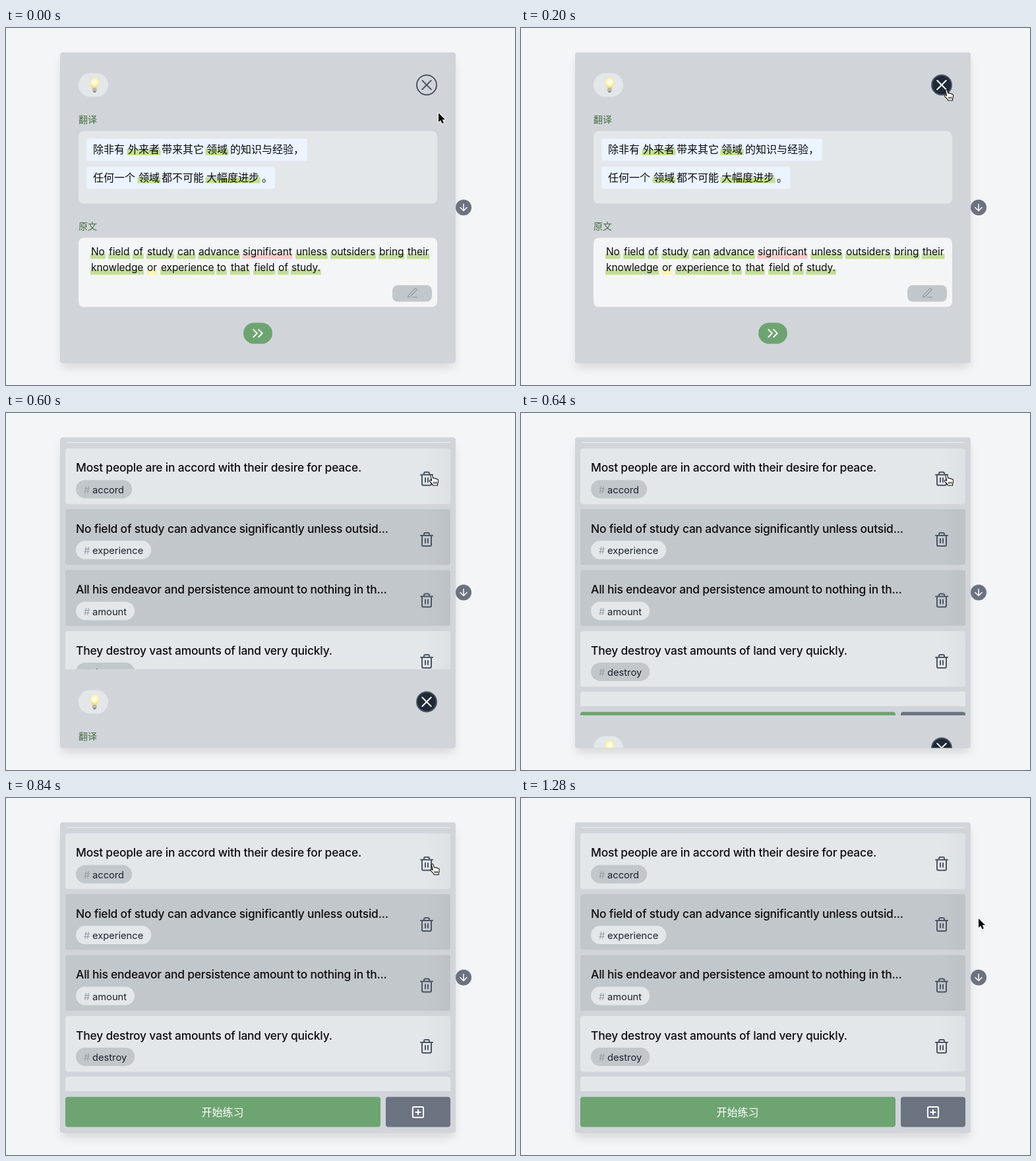
Write an HTML page with a canvas that moves like this. It is 772x542 px and loops after 1.75 s.

```html
<!DOCTYPE html>
<html lang="zh-CN">
<head>
<meta charset="utf-8">
<title>Sentence practice</title>
<style>
html, body { margin: 0; width: 100%; height: 100%; overflow: hidden; background: #f3f5f7; }
canvas { display: block; width: 772px; height: 542px; }
</style>
</head>
<body>
<canvas id="stage" width="772" height="542"></canvas>
<script>
const ctx = document.getElementById('stage').getContext('2d');
const LOOP = 1750, TICK = 40;
const PANEL = { x: 82, y: 37, w: 600, h: 471.5 };
const COLOR = {
  page: '#f3f5f7', panel: '#d1d5da', light: '#e3e7ea', dark: '#c2c7cb', ink: '#0b0c0e',
  icon: '#4b5563', slate: '#6b7280', green: '#6ea471', label: '#476f43',
  known: '#c3de94', hard: '#fbcaca', fresh: '#fdf3b4'
};
const LATIN = 'Inter, sans-serif';
const HAN = '"Noto Sans CJK SC", "Noto Sans CJK", sans-serif';

const ICON = {
  trash: new Path2D('M3 6H21M19 6v14a2 2 0 0 1-2 2H7a2 2 0 0 1-2-2V6m3 0V4a2 2 0 0 1 2-2h4a2 2 0 0 1 2 2v2M10 11v6M14 11v6'),
  cross: new Path2D('M18 6L6 18M6 6l12 12'),
  down: new Path2D('M12 5v14M19 12l-7 7-7-7'),
  next: new Path2D('M13 17l5-5-5-5M6 17l5-5-5-5'),
  edit: new Path2D('M12 20h9M16.5 3.5a2.12 2.12 0 0 1 3 3L7 19l-4 1 1-4z'),
  add: new Path2D('M5 3h14a2 2 0 0 1 2 2v14a2 2 0 0 1-2 2H5a2 2 0 0 1-2-2V5a2 2 0 0 1 2-2zM12 8v8M8 12h8')
};
const ARROW = new Path2D('M0 0V13.8L3.2 10.9L5.4 16L7.9 14.9L5.7 10H10Z');
const HAND = new Path2D('M-1.6 1C-1.6-.8 .6-1 1.1 .8L2.3 5.2C3.4 4.3 4.6 4.8 5 5.7C6 5 7.2 5.5 7.5 6.4C8.7 5.9 9.9 6.6 10 8C10.3 10.4 10.1 12.2 9 14V16H2.2C1.4 13.5-.8 12.2-2.6 10.1C-4 8.6-2.4 7.1-.9 8.1L.2 9Z');

const CARDS = [
  ['Most people are in accord with their desire for peace.', 'accord', false],
  ['No field of study can advance significantly unless outsid...', 'experience', true],
  ['All his endeavor and persistence amount to nothing in th...', 'amount', true],
  ['They destroy vast amounts of land very quickly.', 'destroy', false]
];
const TRANSLATION = [
  { y: 168, right: 457, parts: [['除非有', 132], ['外来者', 185, 1], ['带来其它', 236], ['领域', 304, 1], ['的知识与经验，', 340]] },
  { y: 210.5, right: 408, parts: [['任何一个', 132], ['领域', 201, 1], ['都不可能', 236], ['大幅度进步', 304, 1], ['。', 388]] }
];
const SENTENCE = [
  { y: 344.5, words: [['No', 129], ['field', 156], ['of', 193], ['study', 214], ['can', 260], ['advance', 292],
    ['significant', 359, 'hard'], ['unless', 440], ['outsiders', 493], ['bring', 566], ['their', 609]] },
  { y: 368.5, words: [['knowledge', 129], ['or', 214, 'fresh'], ['experience', 235], ['to', 320], ['that', 341],
    ['field', 376], ['of', 413], ['study.', 433]] }
];

const mix = (a, b, k) => a + (b - a) * k;
const clamp = k => Math.max(0, Math.min(1, k));

function box(x, y, w, h, r, fill) {
  ctx.beginPath();
  ctx.roundRect(x, y, w, h, r);
  ctx.fillStyle = fill;
  ctx.fill();
}

function disc(x, y, r, fill) {
  ctx.beginPath();
  ctx.arc(x, y, r, 0, Math.PI * 2);
  ctx.fillStyle = fill;
  ctx.fill();
}

function setFont(font, spacing = 0) {
  ctx.font = font;
  ctx.letterSpacing = spacing + 'px';
}

function text(str, x, y, fill) {
  ctx.fillStyle = fill;
  ctx.fillText(str, x, y);
}

function icon(path, cx, cy, scale, color, width = 2) {
  ctx.save();
  ctx.translate(cx, cy);
  ctx.scale(scale, scale);
  ctx.translate(-12, -12);
  ctx.lineWidth = width / scale;
  ctx.lineCap = ctx.lineJoin = 'round';
  ctx.strokeStyle = color;
  ctx.stroke(path);
  ctx.restore();
}

function drawPanel() {
  const { x, y, w, h } = PANEL;
  ctx.save();
  ctx.shadowColor = 'rgba(0,0,0,0.12)';
  ctx.shadowBlur = 15;
  ctx.shadowOffsetY = 7;
  box(x + 2, y + 3, w - 4, h - 3, 4, COLOR.panel);
  ctx.restore();
  box(x, y, w, h, 4, COLOR.panel);
}

function drawCard([title, tag, dark], y) {
  box(90, y, 584, 84.5, 4, dark ? COLOR.dark : COLOR.light);
  const shade = ctx.createLinearGradient(636, 0, 674, 0);
  shade.addColorStop(0, 'rgba(90,100,115,0)');
  shade.addColorStop(1, 'rgba(90,100,115,0.05)');
  box(636, y, 38, 84.5, [0, 4, 4, 0], shade);
  setFont(`500 17.4px ${LATIN}`, -0.19);
  text(title, 106, y + 35.7, COLOR.ink);
  setFont(`14.7px ${LATIN}`);
  box(106, y + 48, ctx.measureText(tag).width + 37, 28, 14, dark ? COLOR.light : COLOR.dark);
  text('#', 118, y + 68, '#969da6');
  text(tag, 131, y + 68, '#1c222b');
  icon(ICON.trash, 638, y + 46, 1, COLOR.icon);
}

function drawList() {
  box(92, 44, 581, 1.5, 0.7, '#e6e9ec');
  CARDS.forEach((card, i) => drawCard(card, 53.7 + i * 92.4));
  box(90, 423, 584, 22, [4, 4, 0, 0], COLOR.light);
  box(90, 453.7, 478, 45.7, 4, COLOR.green);
  box(576, 453.7, 98, 45.7, 4, COLOR.slate);
  setFont(`500 16px ${HAN}`);
  text('开始练习', 296.5, 482.7, '#fff');
  icon(ICON.add, 625, 477, 0.9, '#fff');
}

function drawBulb(x, y) {
  const glow = ctx.createRadialGradient(x, y - 4, 1, x, y - 4, 8);
  glow.addColorStop(0, '#fffef0');
  glow.addColorStop(0.6, '#fff6bd');
  glow.addColorStop(1, '#f2d778');
  ctx.beginPath();
  ctx.arc(x, y - 4, 7, Math.PI * 0.82, Math.PI * 0.18);
  ctx.quadraticCurveTo(x + 3.8, y + 3, x + 3.5, y + 6);
  ctx.lineTo(x - 3.5, y + 6);
  ctx.quadraticCurveTo(x - 3.8, y + 3, x - 5.9, y - 0.3);
  ctx.fillStyle = glow;
  ctx.fill();
  box(x - 3.4, y + 5.5, 6.8, 5, 1.5, '#a7a9a7');
  box(x - 3.4, y + 7.3, 6.8, 1, 0, '#d6d7d3');
  box(x - 2, y + 10, 4, 1.8, 1, '#777b7d');
}

function drawClose(hover) {
  disc(638, 86.5, 15, `rgba(31,41,55,${hover})`);
  ctx.lineWidth = 2;
  ctx.strokeStyle = COLOR.icon;
  ctx.stroke();
  const [r, g, b] = [75, 85, 99].map(c => Math.round(mix(c, 255, hover)));
  icon(ICON.cross, 638, 86.5, 1.12, `rgb(${r},${g},${b})`);
}

function drawTranslation() {
  box(110, 156.5, 544, 110, 8, COLOR.light);
  for (const { y, right, parts } of TRANSLATION) {
    box(122, y, right - 122, 33.7, 4, '#ebf4ff');
    setFont(`16px ${HAN}`);
    for (const [str, x, marked] of parts) {
      if (marked) box(x - 1.5, y + 16, ctx.measureText(str).width + 3, 9, 0, COLOR.known);
      text(str, x, y + 22, COLOR.ink);
    }
  }
}

function drawSentence() {
  box(110, 318.5, 544, 105, 8, '#f4f5f7');
  setFont(`15.5px ${LATIN}`, -0.1);
  for (const { y, words } of SENTENCE) {
    for (const [word, x, kind = 'known'] of words) {
      box(x - 1, y - 2, ctx.measureText(word).width + 2, 8, 0, COLOR[kind]);
      text(word, x, y, COLOR.ink);
    }
  }
  box(586, 390.5, 60, 25, 8, COLOR.dark);
  icon(ICON.edit, 616.5, 402.5, 0.78, '#989fa8', 1.4);
}

function drawSheet(offset, hover) {
  ctx.save();
  ctx.translate(0, offset);
  box(PANEL.x, PANEL.y, PANEL.w, PANEL.h, 4, COLOR.panel);
  box(110, 68.5, 45, 36, 18, COLOR.light);
  drawBulb(134.3, 86);
  drawClose(hover);
  setFont(`14px ${HAN}`);
  text('翻译', 110, 143.7, COLOR.label);
  text('原文', 110, 305.7, COLOR.label);
  drawTranslation();
  drawSentence();
  box(360, 447.5, 44, 32, 16, COLOR.green);
  icon(ICON.next, 382, 463.5, 1.12, '#fff');
  ctx.restore();
}

function drawPointer(x, y, hand) {
  ctx.save();
  ctx.translate(x, y);
  ctx.lineJoin = 'round';
  if (hand) {
    ctx.fillStyle = '#fff';
    ctx.fill(HAND);
    ctx.lineWidth = 1.1;
    ctx.strokeStyle = '#111';
    ctx.stroke(HAND);
    ctx.stroke(new Path2D('M3.3 10.5v3M5.4 10.5v3M7.5 10.5v3'));
  } else {
    ctx.lineWidth = 2;
    ctx.strokeStyle = '#fff';
    ctx.stroke(ARROW);
    ctx.fillStyle = '#000';
    ctx.fill(ARROW);
  }
  ctx.restore();
}

// The sheet stalls at first, then leaves in a few uneven steps.
function sheetOffset(t) {
  const steps = [[680, 472], [640, 422], [600, 352], [520, 223.5]];
  const step = steps.find(([from]) => t >= from);
  return step ? step[1] : 0;
}

function pointerAt(t) {
  if (t < 700) {
    const k = 1 - (1 - clamp(t / 200)) ** 2.2;
    const x = mix(656, 645.5, k), y = mix(129, 94, k);
    return { x, y, hand: Math.hypot(x - 638, y - 86.5) < 16 };
  }
  const u = clamp((t - 740) / 380);
  const k = u < 0.5 ? 4 * u ** 3 : 1 - 4 * (1 - u) ** 3;
  const x = mix(645.5, 694, k ** 1.3), y = mix(94, 183, k);
  return { x, y, hand: x < 674 };
}

function draw(now) {
  const t = Math.floor((now % LOOP) / TICK) * TICK;
  const offset = sheetOffset(t);
  const pointer = pointerAt(t);
  ctx.fillStyle = COLOR.page;
  ctx.fillRect(0, 0, 772, 542);
  drawPanel();
  ctx.save();
  ctx.beginPath();
  ctx.roundRect(PANEL.x, PANEL.y, PANEL.w, PANEL.h, 4);
  ctx.clip();
  if (offset) drawList();
  if (offset < PANEL.h) drawSheet(offset, clamp((t - 80) / 120));
  ctx.restore();
  disc(694, 272.5, 12, COLOR.slate);
  icon(ICON.down, 694, 272.5, 0.72, '#fff', 1.5);
  drawPointer(pointer.x, pointer.y, pointer.hand);
}

function frame() {
  draw(performance.now());
  requestAnimationFrame(frame);
}
frame();
</script>
</body>
</html>
```
